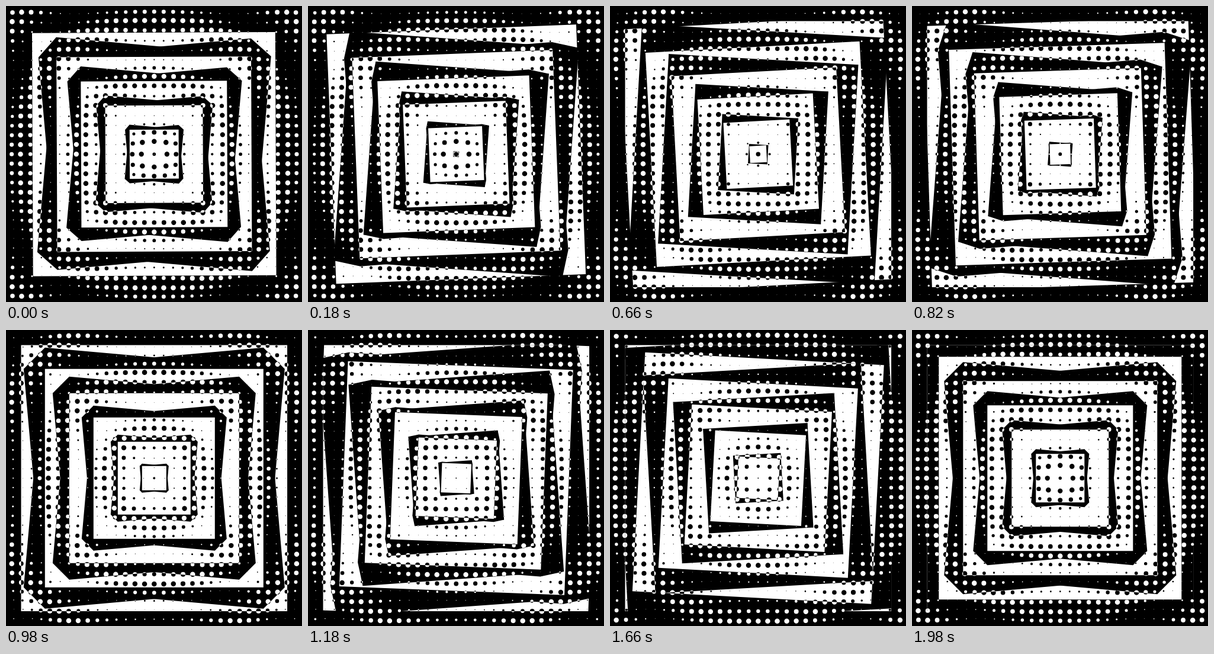
Recreate the animation shown at these times as an HTML page with a canvas. Size 500 px wide and 500 px high, loop 2 s.

```html
<!DOCTYPE html>
<html>
<head>
<meta charset="utf-8">
<style>
html, body { margin: 0; width: 100%; height: 100%; overflow: hidden; background: #000; }
canvas { display: block; }
</style>
</head>
<body>
<canvas id="stage" width="500" height="500"></canvas>
<script>
const ctx = document.getElementById('stage').getContext('2d');
const TAU = Math.PI * 2, DEG = Math.PI / 180;
const BASE = 45, ORBIT = 4;   // half side per ring and the circle its corners travel on
const GRID = 15.7, REACH = 15;

// Four corners of a centred square whose first corner sits at angle phi on its circle
function corners(scale, phi) {
  const u = scale * (BASE + ORBIT * Math.cos(phi));
  const v = scale * ORBIT * Math.sin(phi);
  let x = u - v, y = u + v;
  return [0, 1, 2, 3].map(() => {
    const point = [x, y];
    [x, y] = [-y, x];
    return point;
  });
}

function fill(points, color) {
  ctx.fillStyle = color;
  ctx.beginPath();
  points.forEach(([x, y]) => ctx.lineTo(x, y));
  ctx.fill();
}

function drawRing(scale, swing) {
  const tilt = (90 - 56 * swing) * DEG;
  const a = corners(scale, tilt);
  const b = corners(scale, tilt + Math.PI);
  fill(a, '#000');
  fill(b, '#000');
  a.forEach((point, i) => fill([[0, 0], point, b[i]], '#000'));
  fill(corners(scale, (180 + 40 * swing) * DEG), '#fff');
}

function drawDots(p) {
  ctx.fillStyle = '#fff';
  ctx.beginPath();
  for (let i = -REACH; i <= REACH; i++) {
    for (let j = -REACH; j <= REACH; j++) {
      const r = GRID * Math.hypot(i, j);
      const wave = Math.cos(TAU * (r / 100 + p - 0.22));
      const push = r ? 1 + (4 + 2 * wave) / r : 0;
      const x = i * GRID * push, y = j * GRID * push;
      const size = 2.35 + 1.95 * wave;
      ctx.moveTo(x + size, y);
      ctx.arc(x, y, size, 0, TAU);
    }
  }
  ctx.fill();
}

function draw(p) {
  const swing = Math.sin(TAU * p);
  ctx.setTransform(1, 0, 0, 1, 0, 0);
  ctx.fillStyle = '#000';
  ctx.fillRect(0, 0, 500, 500);
  ctx.translate(250.3, 250.3);

  ctx.save();
  ctx.beginPath();
  ctx.rect(-224.8, -224.8, 449.6, 449.6);
  ctx.clip();
  for (let k = 5; k >= 0; k--) drawRing(k + p, swing);
  ctx.restore();

  ctx.globalCompositeOperation = 'difference';
  drawDots(p);
  ctx.globalCompositeOperation = 'source-over';
}

function tick() {
  const step = Math.floor(performance.now() % 2000 / 20);
  draw((step + 1) / 100);
  requestAnimationFrame(tick);
}
tick();
</script>
</body>
</html>
```
